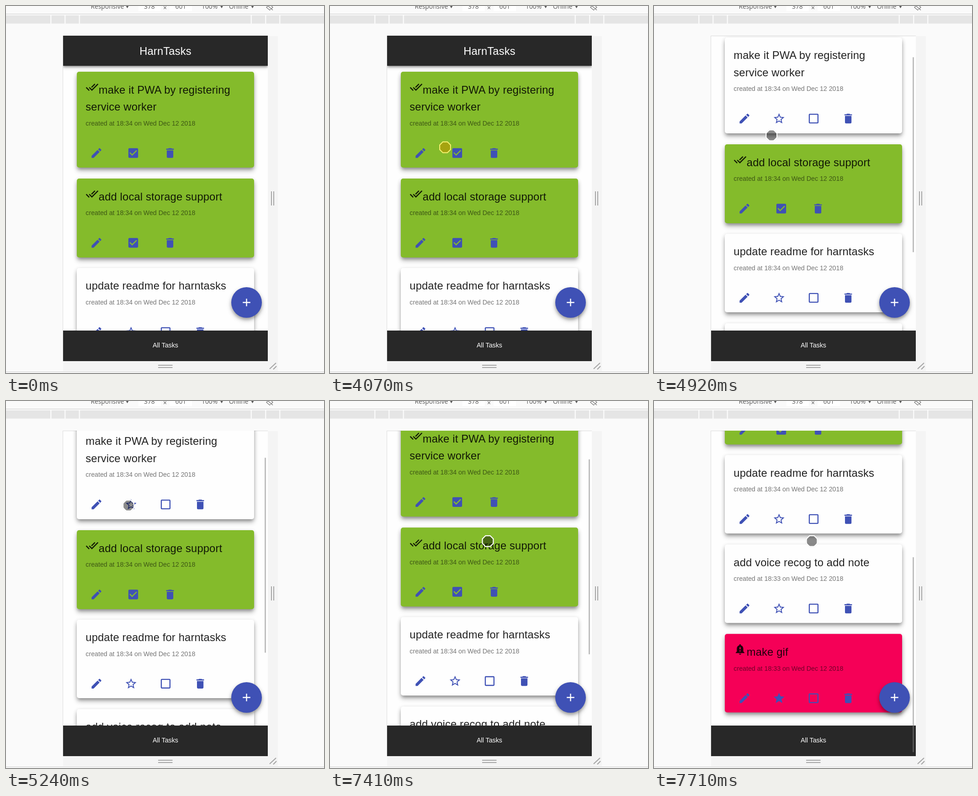
Animation of 696 by 804 pixels, one loop 8000 ms. Source, as an HTML page:

```html
<!DOCTYPE html>
<html lang="en">
<head>
<meta charset="utf-8">
<title>Todo list</title>
<style>
  html, body { margin: 0; width: 100%; height: 100%; overflow: hidden; background: #fafafa; }
  div, svg { position: absolute; }
  svg { left: 0; top: 0; overflow: hidden; }
  text { font-family: "Liberation Sans", Arial, sans-serif; }
  .tools text { font: 13.8px "Open Sans", sans-serif; fill: #5a5a5a; }
  .title { font-size: 23.7px; letter-spacing: .18px; fill: rgba(0, 0, 0, .87); }
  .small { font-size: 14.22px; fill: rgba(0, 0, 0, .54); }
  .white { fill: #fff; }
  #stage { inset: 0; overflow: hidden; contain: strict; }
  #phone { left: 125px; top: 65px; width: 448px; height: 713px; overflow: hidden; contain: strict; }
  /* Children of the phone use stage coordinates */
  #screen { left: -125px; top: -65px; width: 696px; height: 804px; }
  #list { left: 0; top: 0; }
  .bar { left: 125px; width: 448px; background: #282828; }
  .header { top: 65px; height: 66px; box-shadow: 0 2px 5px rgba(0, 0, 0, .4), 0 4px 8px rgba(0, 0, 0, .15); }
  .footer { top: 711px; height: 67px; }
  .card { left: 155px; width: 388px; border-radius: 5px;
    box-shadow: 0 6px 6px -3px rgba(0, 0, 0, .2), 0 8px 11px rgba(0, 0, 0, .18), 0 3px 10px rgba(0, 0, 0, .2); }
  .fab { left: 493px; top: 616px; width: 67px; height: 67px; border-radius: 50%; background: #3f51b5;
    box-shadow: 0 4px 6px rgba(0, 0, 0, .26), 0 5px 12px rgba(0, 0, 0, .2); }
  #scrollbar { left: 566px; top: 67.4px; width: 3px; height: 427px; background: rgba(128, 128, 128, .5); }
  #ring { fill: none; stroke: #fff; stroke-width: 2.2; }
  #disc { fill: rgba(0, 0, 0, .45); }
  .click #ring { stroke: #f4f06c; }
  .click #disc { fill: #a5a310; }
</style>
</head>
<body>
<div id="stage">
  <svg class="tools" id="tools" width="696" height="804"></svg>
  <div id="phone"><div id="screen">
    <div id="list"></div>
    <div class="fab"></div>
    <div class="bar footer"></div>
    <svg id="fixed" width="696" height="804"></svg>
    <div id="scrollbar"></div>
  </div></div>
  <svg width="696" height="804">
    <g id="cursor">
      <polygon id="edge" fill="none" stroke="rgba(0,0,0,.1)"/>
      <circle id="disc" r="11.6"/>
      <polygon id="ring"/>
    </g>
  </svg>
</div>
<script>
const LOOP = 8000, SCALE = 1.185;
const $ = id => document.getElementById(id);
const clamp = x => Math.min(1, Math.max(0, x));

const icons = {
  doneAll: 'M18 7l-1.41-1.41-6.34 6.34 1.41 1.41zm4.24-1.41L11.66 16.17 7.48 12l-1.41 1.41L11.66 19l12-12zM.41 13.41L6 19l1.41-1.41L1.83 12z',
  bell: 'M18 16v-5c0-3.07-1.64-5.64-4.5-6.32V4a1.5 1.5 0 0 0-3 0v.68C7.63 5.36 6 7.92 6 11v5l-2 2v1h16v-1zm-5 0h-2v-2h2zm0-4h-2V8h2zm-1 10a2 2 0 0 0 2-2h-4a2 2 0 0 0 2 2z',
  edit: 'M3 17.25V21h3.75L17.81 9.94l-3.75-3.75zM20.71 7.04a1 1 0 0 0 0-1.41l-2.34-2.34a1 1 0 0 0-1.41 0l-1.83 1.83 3.75 3.75z',
  checked: 'M19 3H5a2 2 0 0 0-2 2v14a2 2 0 0 0 2 2h14a2 2 0 0 0 2-2V5a2 2 0 0 0-2-2zm-9 14l-5-5 1.41-1.41L10 14.17l7.59-7.59L19 8z',
  blank: 'M19 5v14H5V5h14m0-2H5a2 2 0 0 0-2 2v14a2 2 0 0 0 2 2h14a2 2 0 0 0 2-2V5a2 2 0 0 0-2-2z',
  trash: 'M6 19a2 2 0 0 0 2 2h8a2 2 0 0 0 2-2V7H6zM19 4h-3.5l-1-1h-5l-1 1H5v2h14z',
  star: 'M12 17.27L18.18 21l-1.64-7.03L22 9.24l-7.19-.61L12 2 9.19 8.63 2 9.24l5.46 4.73L5.82 21z',
  starHole: 'M12 15.4l-3.76 2.27 1-4.28-3.32-2.88 4.38-.38L12 6.1l1.71 4.04 4.38.38-3.32 2.88 1 4.28z',
  add: 'M19 13h-6v6h-2v-6H5v-2h6V5h2v6h6z'
};
icons.starBorder = icons.star + icons.starHole;

const icon = (name, cx, cy, fill = '#3f51b5') =>
  `<path d="${icons[name]}" fill="${fill}" fill-rule="evenodd" transform="translate(${cx} ${cy}) scale(${SCALE}) translate(-12 -12)"/>`;
const label = (x, y, str, cls = '', anchor = 'start') =>
  `<text x="${x}" y="${y}" class="${cls}" text-anchor="${anchor}">${str}</text>`;
const rect = (x, y, w, h, fill) => `<rect x="${x}" y="${y}" width="${w}" height="${h}" fill="${fill}"/>`;

// Browser device toolbar, ruler and resize handles
const arrow = x => `<path d="M${x} -1h7l-3.5 6z" fill="#5a5a5a"/>`;
$('tools').innerHTML =
  rect(290, 0, 49, 11, '#fff') + rect(358, 0, 49, 11, '#fff') +
  label(185.5, 6.3, 'Responsive') + label(302, 6.3, '378') + label(344, 8.5, '×') +
  label(370.5, 6.3, '601') + label(428, 6.3, '100%') + label(488, 6.3, 'Online') +
  [262, 468.5, 536].map(arrow).join('') +
  '<path d="M570 3l7-7 7 7-7 6zM570-3l14 12" fill="none" stroke="#777" stroke-width="1.3"/>' +
  rect(0, 17, 696, 1, '#ccc') + rect(0, 20.5, 696, 18, '#e5e5e5') +
  [97, 128, 159.5, 535.5, 567, 598].map(x => rect(x, 20, 2.5, 19, '#fafafa')).join('') +
  rect(125, 66, 470, 734, '#f4f4f4') + rect(124, 65, 449, 713, '#ddd') + rect(125, 66, 448, 712, '#fefefe') +
  rect(580, 406, 2, 31, '#a5a5a5') + rect(585, 406, 2, 31, '#a5a5a5') +
  rect(333, 786, 31.5, 2, '#a5a5a5') + rect(333, 791, 31.5, 2, '#a5a5a5') +
  '<path d="M577 795l14-13M585 796l7-7" stroke="#a5a5a5" stroke-width="2.2"/>' +
  rect(0, 801, 696, 1, '#ccc');

$('fixed').innerHTML = icon('add', 526.5, 649.5, '#fff') + label(349, 748, 'All Tasks', 'small white', 'middle');

const kinds = {
  open: { color: '#fefefe', row: ['edit', 'starBorder', 'blank', 'trash'], gap: 75.7 },
  done: { color: '#84bb2b', row: ['edit', 'checked', 'trash'], gap: 80.5, mark: 'doneAll' },
  urgent: { color: '#f50057', row: ['edit', 'star', 'blank', 'trash'], gap: 75.7, mark: 'bell' }
};

function card(id, kind, top, height, time, ...lines) {
  const { color, row, gap, mark } = kinds[kind];
  const titleY = mark ? 47.8 : 47.3;
  const noteY = titleY + 32.6 + 37.3 * (lines.length - 1);
  return `<div class="card" id="${id}" style="top:${top}px;height:${height}px;background:${color}"><svg width="388" height="${height}">` +
    (mark ? icon(mark, 33.4, 33.6, 'rgba(0,0,0,.87)') : '') +
    lines.map((s, i) => label(mark && !i ? 47.8 : 19.3, titleY + 37.5 * i, s, 'title')).join('') +
    label(19.3, noteY, `created at ${time} on Wed Dec 12 2018`, 'small') +
    row.map((name, i) => icon(name, 43 + gap * i, noteY + 60.4)).join('') + '</svg></div>';
}

const first = ['18:34', 'make it PWA by registering', 'service worker'];
$('list').innerHTML =
  card('firstDone', 'done', 144, 210, ...first) +
  card('firstOpen', 'open', 144, 210, ...first) +
  card('second', 'done', 378, 173, '18:34', 'add local storage support') +
  card('third', 'open', 574.2, 172, '18:34', 'update readme for harntasks') +
  card('fourth', 'open', 769.7, 172, '18:33', 'add voice recog to add note') +
  card('fifth', 'urgent', 965.7, 172.3, '18:33', 'make gif') +
  '<div class="bar header"></div><svg width="696" height="804">' +
  label(349, 107, 'HarnTasks', 'title white', 'middle') + '</svg>';

const octagon = r => Array.from({ length: 8 }, (_, i) => {
  const a = (i + .5) * Math.PI / 4;
  return `${r * Math.cos(a)},${r * Math.sin(a)}`;
}).join(' ');
$('ring').setAttribute('points', octagon(12.9));
$('edge').setAttribute('points', octagon(14));

// Screen updates: first, last, count
const updates = [
  [430, 660, 4], [810, 1040, 4], [4070], [4210], [4620, 5390, 11],
  [5460, 6230, 11], [6540], [6690], [6940, 7090, 3], [7340, 7710, 6]
];
function heldTime(t) {
  let held = 0;
  for (const [from, to = from, count = 1] of updates) {
    if (t < from) break;
    const step = (to - from) / (count - 1) || 1;
    held = Math.min(to, from + Math.floor((t - from) / step + .1) * step);
  }
  return held;
}

// Pointer path: time, x, y
const path = [
  [430, 397, 557], [660, 161, 237], [733, 161, 237], [1040, 252, 309.5], [4780, 252, 309.5], [5236, 268, 229],
  [5390, 268, 229], [5620, 258, 230], [6230, 366, 233], [6865, 366, 233], [7090, 345.5, 307], [LOOP, 345.5, 307]
];
function pointer(t) {
  const i = Math.max(1, path.findIndex(p => p[0] >= t));
  const [t0, x0, y0] = path[i - 1], [t1, x1, y1] = path[i];
  const k = clamp((t - t0) / (t1 - t0));
  return [x0 + (x1 - x0) * k, y0 + (y1 - y0) * k];
}

const easeSine = p => (1 - Math.cos(Math.PI * p)) / 2;
const easeCubic = p => p < .5 ? 4 * p ** 3 : 1 - 4 * (1 - p) ** 3;
const scrollAt = t => 95 * easeSine(clamp((t - 4580) / 500)) + 360.7 * easeCubic(clamp((t - 7358) / 352));
const within = (t, a, b) => t >= a && t < b;

function draw(t) {
  const scroll = scrollAt(t), open = within(t, 4210, 6690);
  $('list').style.transform = `translateY(${-scroll}px)`;
  $('firstOpen').style.display = open ? '' : 'none';
  $('firstDone').style.display = open ? 'none' : '';
  $('scrollbar').style.transform = `translateY(${scroll * .604}px)`;
  $('scrollbar').style.opacity = t >= 7340 ? 1 : t >= 4620 ? clamp((5700 - t) / 300) : 0;
  $('cursor').style.display = t < 430 ? 'none' : '';
  $('cursor').setAttribute('transform', `translate(${pointer(t)})`);
  $('cursor').setAttribute('class', within(t, 4070, 4210) || within(t, 6540, 6690) ? 'click' : '');
}

const start = performance.now();
function frame() {
  draw(heldTime((performance.now() - start) % LOOP));
  requestAnimationFrame(frame);
}
frame();
</script>
</body>
</html>
```
